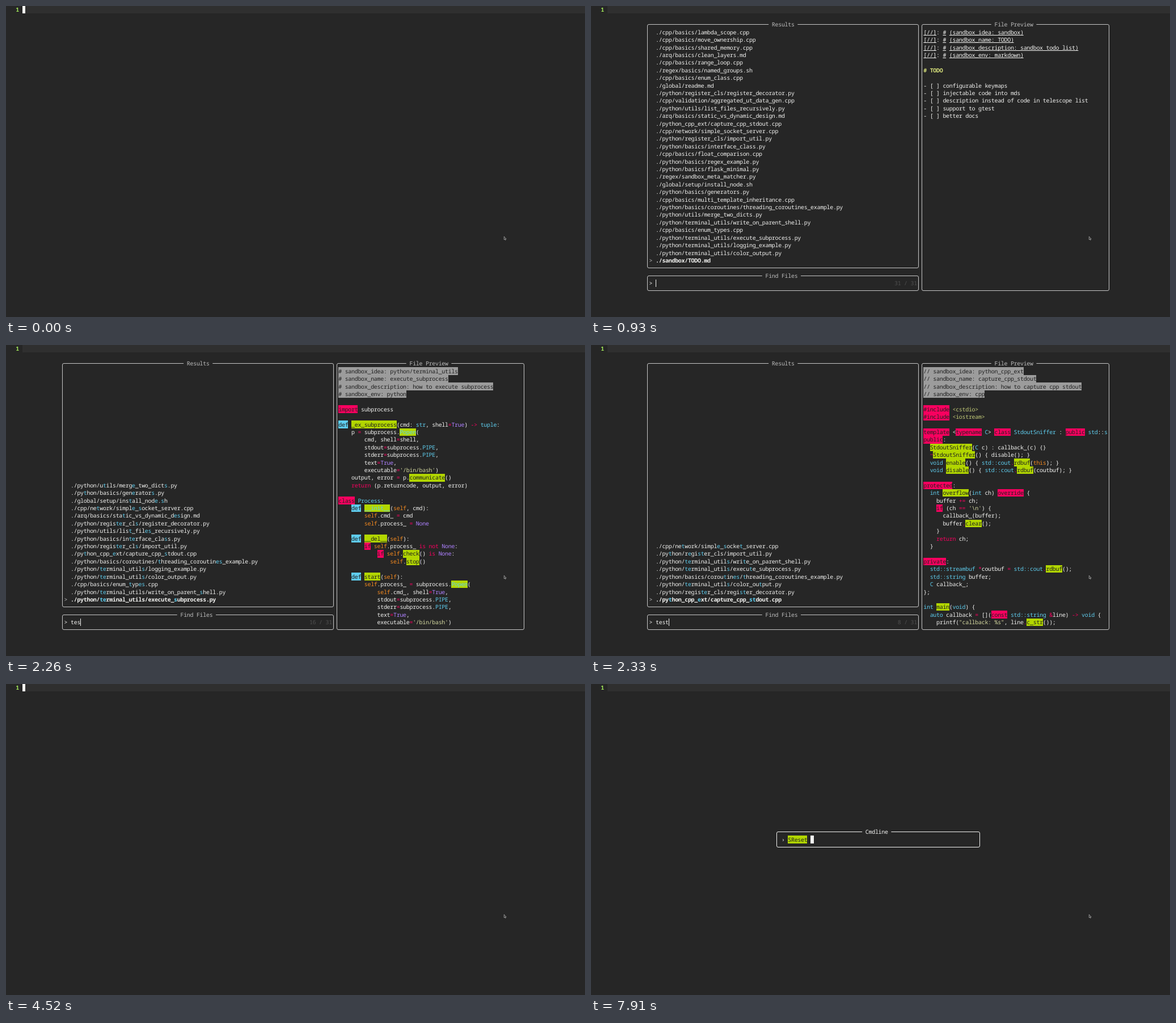
These frames come from a looping animation (1021 by 548 pixels, 8 s). An HTML page:

```html
<!DOCTYPE html>
<html lang="en">
<head>
<meta charset="utf-8">
<title>Editor session</title>
<style>
html, body { margin: 0; width: 100%; height: 100%; overflow: hidden; background: #262626; }
svg { display: block; width: 1021px; height: 548px; }
text {
  font: 10px "Noto Sans Mono", "DejaVu Sans Mono", monospace;
  letter-spacing: -0.31px;
  white-space: pre;
  text-rendering: geometricPrecision;
}
</style>
</head>
<body>
<svg id="stage" viewBox="0 0 1021 548" xmlns="http://www.w3.org/2000/svg"></svg>
<script>
const CW = 5.69, RH = 13.405, BASE = 10.3, LOOP = 8000;
const colX = c => 0.2 + c * CW;
const rowY = r => r * RH - 0.75;
const snap = v => Math.floor(v) + 0.5;
const raw = String.raw;
const DARK = '#202020', LIME = '#b2d600', PINK = '#f9005f', CYAN = '#5fcdee', GREY = '#9c9c9c', WHITE = '#f2f2f0';

// one letter per text style
const STYLES = {
  n: { fill: WHITE },
  w: { fill: WHITE, bold: true },
  H: { fill: CYAN },
  W: { fill: CYAN, bold: true },
  G: { fill: DARK, bg: LIME },
  g: { fill: CYAN, bg: LIME },
  P: { fill: DARK, bg: PINK },
  B: { fill: DARK, bg: CYAN },
  C: { fill: DARK, bg: GREY },
  A: { fill: '#000', bg: GREY, bold: true },
  c: { fill: CYAN },
  p: { fill: PINK },
  o: { fill: '#f58a1f' },
  v: { fill: '#ae81ff' },
  y: { fill: '#d5d9a0' },
  s: { fill: '#c3cb78' },
  u: { fill: WHITE, line: true },
  h: { fill: '#d6e07a', bold: true },
  k: { fill: '#a2ea5a', bold: true },
  t: { fill: '#bcbcbc' },
  d: { fill: '#505050' }
};

const stage = document.getElementById('stage');

function add(parent, name, attrs = {}) {
  const el = document.createElementNS(stage.namespaceURI, name);
  for (const k in attrs) el.setAttribute(k, attrs[k]);
  parent.appendChild(el);
  return el;
}
const group = parent => add(parent, 'g');
const show = (el, on) => el.setAttribute('display', on ? 'inline' : 'none');

function cells(parent, col, row, n, fill) {
  return add(parent, 'rect', {
    x: colX(col), y: rowY(row), width: n * CW, height: RH, fill, 'shape-rendering': 'crispEdges'
  });
}

function run(parent, col, row, str, key = 'n') {
  const s = STYLES[key], y = rowY(row) + BASE;
  if (s.bg) cells(parent, col, row, str.length, s.bg);
  if (s.line) add(parent, 'rect', { x: colX(col), y: Math.floor(y + 1.5), width: str.length * CW, height: 1, fill: s.fill });
  const el = add(parent, 'text', { x: colX(col), y, fill: s.fill });
  if (s.bold) el.style.fontWeight = 700;
  el.textContent = str;
}

// markup: ^Xtext^ sets text in style X
function line(parent, col, row, src, base = 'n') {
  for (const part of src.split(/(\^.[^^]*\^)/)) {
    if (!part) continue;
    const marked = part[0] === '^';
    const str = marked ? part.slice(2, -1) : part;
    run(parent, col, row, str, marked ? part[1] : base);
    col += str.length;
  }
}

// rounded frame through cell centres, with a gap for the title
function frame(parent, c0, r0, c1, r1, title, at, stroke, key) {
  const [x0, x1] = [c0, c1].map(c => snap(colX(c + .5)));
  const [y0, y1] = [r0, r1].map(r => snap(rowY(r + .5)));
  const q = 2.5, gapL = colX(at - 1), gapR = colX(at + title.length + 1);
  add(parent, 'path', {
    d: `M${gapL} ${y0}H${x0 + q}Q${x0} ${y0} ${x0} ${y0 + q}V${y1 - q}Q${x0} ${y1} ${x0 + q} ${y1}` +
       `H${x1 - q}Q${x1} ${y1} ${x1} ${y1 - q}V${y0 + q}Q${x1} ${y0} ${x1 - q} ${y0}H${gapR}`,
    fill: 'none', stroke, 'stroke-width': 1
  });
  run(parent, at, r0, title, key);
}

const TODO = raw`^u[//]^: ^u#^ ^u(sandbox_idea: sandbox)^
^u[//]^: ^u#^ ^u(sandbox_name: TODO)^
^u[//]^: ^u#^ ^u(sandbox_description: sandbox todo list)^
^u[//]^: ^u#^ ^u(sandbox_env: markdown)^

^h# TODO^

- [ ] configurable keymaps
- [ ] injectable code into mds
- [ ] description instead of code in telescope list
- [ ] support to gtest
- [ ] better docs`;

const PROCESS = raw`^C# sandbox_idea: python/terminal_utils^
^C# sandbox_name: execute_subprocess^
^C# sandbox_description: how to execute subprocess^
^C# sandbox_env: python^

^Pimport^ subprocess

^Bdef^ ^G_ex_subprocess^(cmd: ^cstr^, shell^p=^^vTrue^) ^p->^ ^ctuple^:
    p ^p=^ subprocess.^gPopen^(
        cmd, shell^p=^shell,
        stdout^p=^subprocess.^cPIPE^,
        stderr^p=^subprocess.^cPIPE^,
        text^p=^^vTrue^,
        executable^p=^^y'/bin/bash'^)
    output, error ^p=^ p.^Gcommunicate^()
    ^preturn^ (p.returncode, output, error)

^Pclass^ ^cProcess^:
    ^Bdef^ ^g__init__^(^oself^, cmd):
        ^oself^.cmd_ ^p=^ cmd
        ^oself^.process_ ^p=^ ^vNone^

    ^Bdef^ ^G__del__^(^oself^):
        ^Pif^ ^oself^.process_ ^pis not^ ^vNone^:
            ^Pif^ ^oself^.^Gcheck^() ^pis^ ^vNone^:
                ^oself^.^Gstop^()

    ^Bdef^ ^Gstart^(^oself^):
        ^oself^.process_ ^p=^ subprocess.^gPopen^(
            ^oself^.cmd_, shell^p=^^vTrue^,
            stdout^p=^subprocess.^cPIPE^,
            stderr^p=^subprocess.^cPIPE^,
            text^p=^^vTrue^,
            executable^p=^^y'/bin/bash'^)`;

const SNIFFER = raw`^C// sandbox_idea: python_cpp_ext^
^C// sandbox_name: capture_cpp_stdout^
^C// sandbox_description: how to capture cpp stdout^
^C// sandbox_env: cpp^

^P#include^ ^s<cstdio>^
^P#include^ ^s<iostream>^

^Ptemplate^ <^Ptypename^ ^cC^> ^Pclass^ ^cStdoutSniffer^ : ^Ppublic^ ^cstd^::^cs^
^Ppublic^:
  ^GStdoutSniffer^(^cC^ c) : callback_(c) {}
  ^p~^^GStdoutSniffer^() { disable(); }
  ^cvoid^ ^Genable^() { ^cstd::cout^^p.^^Grdbuf^(^othis^); }
  ^cvoid^ ^Gdisable^() { ^cstd::cout^^p.^^Grdbuf^(coutbuf); }

^Pprotected^:
  ^cint^ ^Goverflow^(^cint^ ch) ^Poverride^ {
    buffer ^p+=^ ch;
    ^Pif^ (ch ^p==^ ^y'\n'^) {
      callback_(buffer);
      buffer^p.^^Gclear^();
    }
    ^preturn^ ch;
  }

^Pprivate^:
  ^cstd::streambuf^ ^p*^coutbuf ^p=^ ^cstd::cout^^p.^^Grdbuf^();
  ^cstd::string^ buffer;
  ^cC^ callback_;
};

^cint^ ^Gmain^(^cvoid^) {
  ^cauto^ callback ^p=^ [](^Pconst^ ^cstd::string^ ^p&^line) ^p->^ ^cvoid^ {
    printf(^y"callback: %s"^, line^p.^^Gc_str^());`;

const T_FILES = `./python/register_cls/register_decorator.py
./cpp/validation/aggregated_ut_data_gen.cpp
./python/utils/list_files_recursively.py
./arq/basics/static_vs_dynamic_design.md
./python_cpp_ext/capture_cpp_stdout.cpp
./cpp/network/simple_socket_server.cpp
./python/register_cls/import_util.py
./python/basics/interface_class.py
./cpp/basics/float_comparison.cpp
./python/basics/regex_example.py
./python/basics/flask_minimal.py
./regex/sandbox_meta_matcher.py
./global/setup/install_node.sh
./python/basics/generators.py
./cpp/basics/multi_template_inheritance.cpp
./python/basics/coroutines/threading_coroutines_example.py
./python/utils/merge_two_dicts.py
./python/terminal_utils/write_on_parent_shell.py
./cpp/basics/enum_types.cpp
./python/terminal_utils/execute_subprocess.py
./python/terminal_utils/logging_example.py
./python/terminal_utils/color_output.py
./sandbox/TODO.md`.split('\n');

const OTHER_FILES = `./cpp/basics/lambda_scope.cpp
./cpp/basics/move_ownership.cpp
./cpp/basics/shared_memory.cpp
./arq/basics/clean_layers.md
./cpp/basics/range_loop.cpp
./regex/basics/named_groups.sh
./cpp/basics/enum_class.cpp
./global/readme.md`.split('\n');

// square brackets mark matched letters
const TES_FILES = `./python/u[t]ils/merg[e]_two_dict[s].py
./py[t]hon/basics/gen[e]rator[s].py
./global/setup/ins[t]all_nod[e].[s]h
./cpp/ne[t]work/simpl[e]_[s]ocket_server.cpp
./arq/basics/sta[t]ic_vs_dynamic_d[e][s]ign.md
./python/regis[t][e]r_cl[s]/register_decorator.py
./python/utils/lis[t]_fil[e][s]_recursively.py
./python/basics/in[t][e]rface_cla[s]s.py
./python/regis[t][e]r_cl[s]/import_util.py
./py[t]hon_cpp_[e]xt/capture_cpp_[s]tdout.cpp
./python/basics/coroutines/[t]hreading_coroutin[e][s]_example.py
./python/[t][e]rminal_util[s]/logging_example.py
./python/[t][e]rminal_util[s]/color_output.py
./cpp/basics/enum_[t]yp[e][s].cpp
./python/[t][e]rminal_utils/write_on_parent_[s]hell.py
./python/[t][e]rminal_utils/execute_[s]ubprocess.py`.split('\n');

const TEST_FILES = `./cpp/ne[t]work/simpl[e]_[s]ocke[t]_server.cpp
./py[t]hon/r[e]gi[st]er_cls/import_util.py
./python/[te]rminal_util[s]/wri[t]e_on_parent_shell.py
./python/[te]rminal_util[s]/execu[t]e_subprocess.py
./python/basics/corou[t]in[es]/[t]hreading_coroutines_example.py
./python/[te]rminal_util[s]/color_ou[t]put.py
./python/regis[te]r_cls/regi[st]er_decorator.py
./py[t]hon_cpp_[e]xt/capture_cpp_[st]dout.cpp`.split('\n');

const TE_FILES = `./cpp/validation/aggrega[te]d_ut_data_gen.cpp
./py[t]hon/basics/r[e]gex_example.py
./regex/sandbox_me[t]a_match[e]r.py
./cpp/basics/multi_[te]mplate_inheritance.cpp`.split('\n')
  .concat(TES_FILES.map(f => f.replace('[s]', 's')));

// a word-initial t wins, otherwise the last t
function markT(f) {
  let at = -1;
  for (const m of f.matchAll(/[/_]t/gi)) at = m.index + 1;
  if (at < 0) at = f.lastIndexOf('t');
  return f.slice(0, at) + '[' + f[at] + ']' + f.slice(at + 1);
}

// static base
cells(stage, 5, 0, 176, '#2f2f2f');
run(stage, 3, 0, '1', 'k');
const topCursor = cells(stage, 5, 0, 1, WHITE);

// key menu
const menu = group(stage);
add(menu, 'rect', { x: 0, y: 482, width: 1021, height: 66, fill: '#2f2f2f' });
cells(menu, 0, 40, 3, PINK);
add(menu, 'path', { d: 'M6.3 541.6v1.2h4.6v-1.2', fill: 'none', stroke: DARK, 'stroke-width': 1 });
line(menu, 81, 40, '^G  ^^C close^  ^G ^^C back^');
const esc = add(menu, 'text', { x: colX(81) + .2, y: 543.6, fill: DARK });
esc.style.font = '700 3px "Noto Sans Mono", monospace';
esc.style.letterSpacing = 0;
esc.textContent = 'esc';
add(menu, 'path', { d: 'M518.3 542.2l2-2.3h3.3v4.6h-3.3z', fill: DARK });
add(menu, 'path', { d: 'M520.8 541.2l1.8 2m0-2l-1.8 2', stroke: LIME, 'stroke-width': .6 });
const rootKeys = group(menu), subKeys = group(menu);
line(rootKeys, 4, 37, '^Gg ^^A→ ^');
line(subKeys, 4, 37, '^Gl ^^A→ ^   ^Gw ^^A→ ^');
line(subKeys, 4, 38, '^Gm ^^A→ ^');
line(subKeys, 3, 40, '^C » ^^Pg ^');

// file finder
const finder = group(stage);
const EDGE = '#c6c6c6';
frame(finder, 17, 2, 101, 34, 'Results', 56, EDGE, 't');
frame(finder, 17, 35, 101, 37, 'Find Files', 54, EDGE, 't');
frame(finder, 102, 2, 160, 37, 'File Preview', 125, EDGE, 't');
run(finder, 18, 36, '>');
run(finder, 18, 33, '>', 't');

function search(query, files, preview) {
  const g = group(finder);
  files.forEach((f, i) => {
    const last = i === files.length - 1;
    const src = f.replace(/\[(\w+)\]/g, last ? '^W$1^' : '^H$1^');
    line(g, 20, 34 - files.length + i, src, last ? 'w' : 'n');
  });
  preview.split('\n').forEach((s, i) => line(g, 103, 3 + i, s));
  const count = files.length + ' / 31';
  run(g, 101 - count.length, 36, count, 'd');
  if (query) run(g, 20, 36, query);
  return g;
}
const searches = [
  search('', OTHER_FILES.concat(T_FILES), TODO),
  search('t', T_FILES.map(markT), TODO),
  search('te', TE_FILES, PROCESS),
  search('tes', TES_FILES, PROCESS),
  search('test', TEST_FILES, SNIFFER)
];
const bar = add(finder, 'rect', { y: Math.round(rowY(36)), width: 1, height: 13, fill: WHITE });
const block = group(finder);
cells(block, 23, 36, 1, WHITE);
add(block, 'text', { x: colX(23), y: rowY(36) + BASE, fill: DARK }).textContent = 't';

// command line
const cmd = group(stage);
frame(cmd, 57, 19, 120, 21, 'Cmdline', 85, WHITE, 'n');
run(cmd, 59, 20, '›');
const typed = group(cmd);
const cmdCursor = cells(cmd, 61, 20, 1, WHITE);

// mouse pointer
add(stage, 'path', {
  d: 'M878.3 406.2v5.4l1.2-1 .9 1.9 .9-.4-.8-1.8h1.5z',
  fill: '#1c1c1c', stroke: '#c4c4c4', 'stroke-width': .7
});

const QUERY_TIMES = [2000, 2130, 2260, 2330];
const CMD_TIMES = [6580, 7040, 7240, 7440, 7580, 7710, 7910];
const passed = (times, t) => times.filter(x => t >= x).length;
const within = (t, a, b) => t >= a && t < b;
let last = '';

function draw(t) {
  const inMenu = within(t, 200, 870), inFinder = within(t, 870, 4520), inCmd = t >= 6250;
  show(topCursor, !inFinder && !inCmd);
  show(menu, inMenu);
  show(rootKeys, t < 730);
  show(subKeys, t >= 730);

  show(finder, inFinder);
  const n = passed(QUERY_TIMES, t);
  searches.forEach((g, i) => show(g, i === n && t >= 930));
  bar.setAttribute('x', Math.round(colX(20 + n)));
  show(bar, t < 3990);
  show(block, t >= 3990);

  show(cmd, inCmd);
  const k = passed(CMD_TIMES, t);
  const word = 'SReset'.slice(0, k);
  const key = word + (t >= 6650);
  if (key !== last) {
    typed.replaceChildren();
    if (word) run(typed, 61, 20, word, t < 6650 ? 'n' : 'G');
    last = key;
  }
  cmdCursor.setAttribute('x', colX(61 + k));
}

function tick() {
  draw(performance.now() % LOOP);
  requestAnimationFrame(tick);
}
tick();
</script>
</body>
</html>
```
